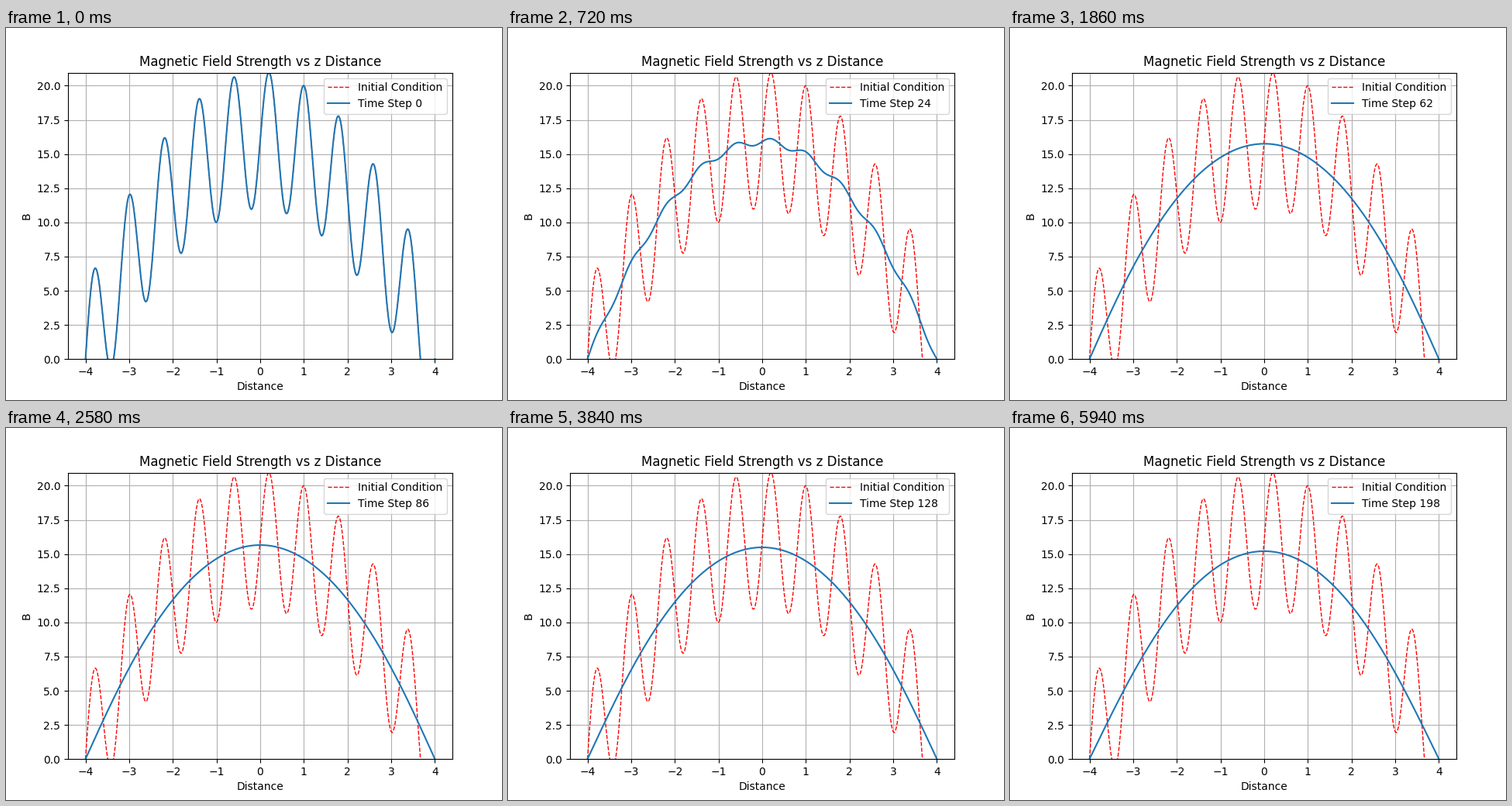
Write a matplotlib script that moves like this. It is 640x480 px and loops after 6 s.

```python
import numpy as np
import matplotlib.pyplot as plt
from matplotlib.animation import FuncAnimation

HALF = 4.0            # field vanishes at z = -HALF and z = HALF
K = 2.5 * np.pi       # wavenumber of the ripple
DIFF = 0.002          # diffusivity times one time step
FRAMES = 100
STEPS_PER_FRAME = 2

z = np.linspace(-HALF, HALF, 501)
start = HALF**2 - z**2 + 5 * np.sin(K * z)

# Cosine modes of the parabola HALF^2 - z^2
m = np.arange(60)
q = (2 * m + 1) * np.pi / (2 * HALF)
coef = 4 * (-1.0) ** m / (HALF * q**3)
modes = np.cos(np.outer(z, q))


def field(step):
    """Solution of the diffusion equation after the given number of steps."""
    if step == 0:
        return start
    t = DIFF * step
    parabola = modes @ (coef * np.exp(-q**2 * t))
    ripple = 5 * np.exp(-K**2 * t) * np.sin(K * z)
    return parabola + ripple


fig, ax = plt.subplots(figsize=(6.4, 4.8), dpi=100)
ax.plot(z, start, "r--", lw=1, label="Initial Condition")
line, = ax.plot(z, start, color="C0", label="Time Step 0")
ax.set_ylim(0, start.max())
ax.set_title("Magnetic Field Strength vs z Distance")
ax.set_xlabel("Distance")
ax.set_ylabel("B")
ax.grid(True)
legend = ax.legend(loc="upper right")
step_label = legend.get_texts()[1]


def update(frame):
    step = frame * STEPS_PER_FRAME
    line.set_ydata(field(step))
    step_label.set_text(f"Time Step {step}")
    return line, step_label


anim = FuncAnimation(fig, update, frames=FRAMES, interval=60,
                     repeat=True, repeat_delay=0)
plt.show()
```
